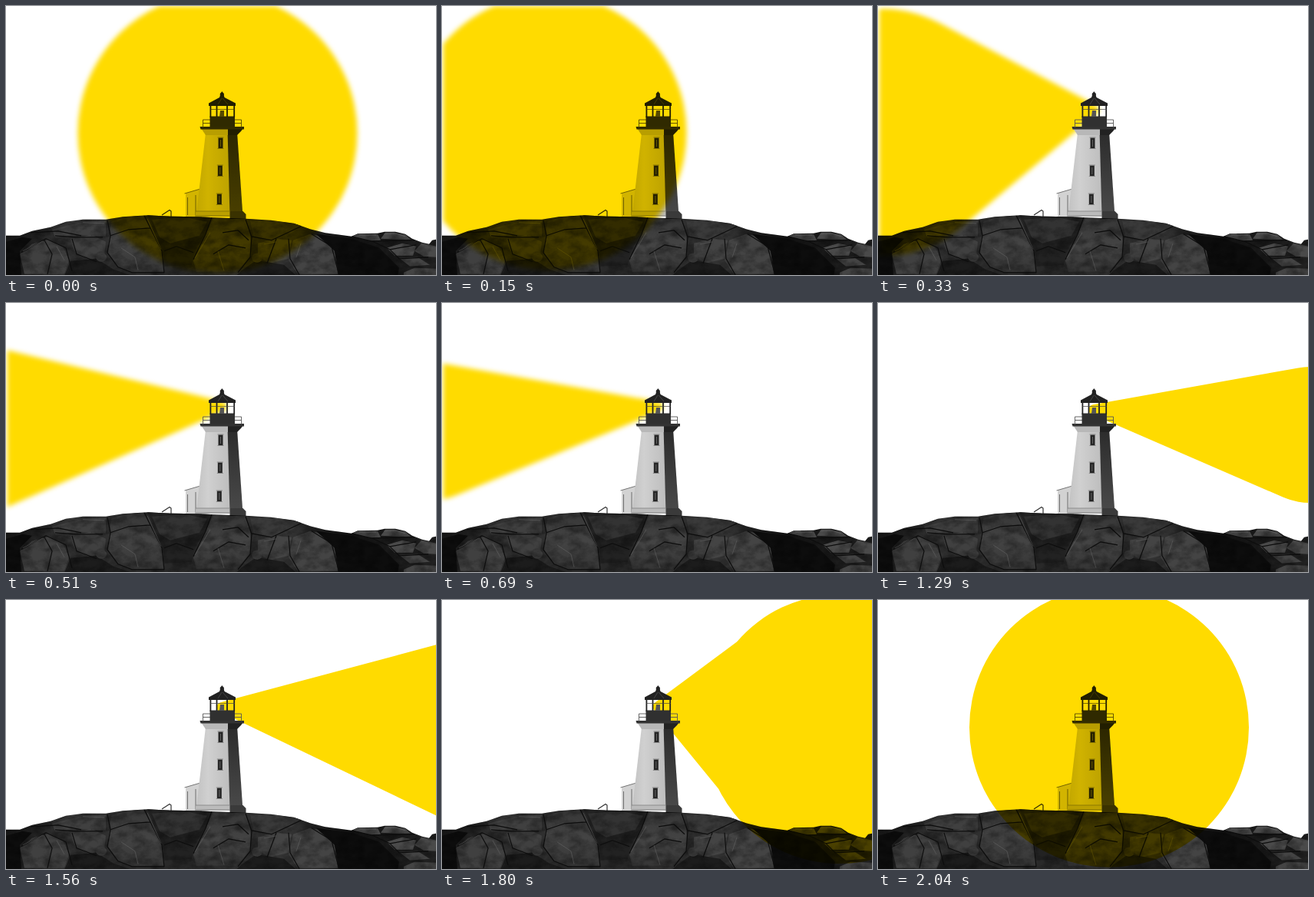
These frames come from a looping animation (560x350 px, 2070 ms). An HTML page:

```html
<!DOCTYPE html>
<html lang="en">
<head>
<meta charset="utf-8">
<title>Lighthouse</title>
<style>
html, body { margin: 0; width: 100%; height: 100%; overflow: hidden; background: #fff; }
#stage { position: relative; width: 560px; height: 350px; overflow: hidden; background: #fff; isolation: isolate; }
svg { position: absolute; left: 0; top: 0; width: 560px; height: 350px; }
#rocks, #tower.tinted { mix-blend-mode: multiply; }
.crack { fill: none; stroke: #0c0c0c; stroke-width: 1.2; stroke-linejoin: round; }
.edge { fill: none; stroke: #777; stroke-width: .8; opacity: .5; }
</style>
</head>
<body>
<div id="stage">
<svg viewBox="0 0 560 350">
  <defs>
    <filter id="soft" filterUnits="userSpaceOnUse" x="-20" y="-20" width="600" height="390" color-interpolation-filters="sRGB">
      <feGaussianBlur id="blur" stdDeviation="3"/>
    </filter>
    <clipPath id="frame"><path d="M1.500 0H580V370H1.500Z"/></clipPath>
  </defs>
  <g filter="url(#soft)"><g clip-path="url(#frame)"><path id="beam" fill="#ffdb00"/></g></g>
</svg>

<svg id="tower" viewBox="0 0 560 350">
  <defs>
    <linearGradient id="lit" x1="0" x2="1" y1="0" y2="0">
      <stop offset="0" stop-color="#c2c2c2"/>
      <stop offset=".35" stop-color="#d0d0d0"/>
      <stop offset="1" stop-color="#bdbdbd"/>
    </linearGradient>
    <linearGradient id="shade" x1="0" x2="0" y1="0" y2="1">
      <stop offset="0" stop-color="#2b2b2b"/>
      <stop offset="1" stop-color="#4a4a4a"/>
    </linearGradient>
  </defs>
  <path fill="#d2d2d2" d="M234 243.500 252 238.500V274H234Z"/>
  <path stroke="#555" fill="none" d="M232.500 244 253 238M236.500 249V272M247 246V272" stroke-width=".8"/>
  <path fill="url(#lit)" d="M260.500 161H289L292 274H247.500Z"/>
  <path fill="url(#shade)" d="M288.500 161H300.800L308.500 274H291.500Z"/>
  <path fill="#bbb" d="M247.500 267H292V274H246.500Z"/>
  <path fill="#3a3a3a" d="M291.500 267H308.500L312.500 271V277H291.500Z"/>
  <path stroke="#777" stroke-width=".7" d="M247 267H292M246 273H292"/>
  <path fill="#b8b8b8" d="M254 159H289V168H260Z"/>
  <path fill="#222" d="M289 159H309L306 163 301 168H289Z"/>
  <path fill="#333" d="M252.500 157H310V160.500H253.500Z"/>
  <path fill="none" stroke="#555" stroke-width=".9" d="M256.500 158V148H266M256.500 152.500H266M298 148H306.500V158M298 152.500H306.500"/>
  <path fill="#303030" d="M265.500 143.500H298V157H265.500Z"/>
  <path fill="none" stroke="#222" stroke-width="1.800" d="M266.400 129V145M297.200 129V145M274.500 130V144M288 130V144"/>
  <path stroke="#444" d="M266 134.500H298" stroke-width=".7"/>
  <path fill="#555" d="M279 136H284V144H278Z"/>
  <path fill="#222" d="M264 126.500 278 119 280 113 281.300 111 282.600 113 284.600 119 299 126.500V130H264Z"/>
  <circle cx="281.300" cy="115" r="2.600" fill="#222"/>
  <path stroke="#555" d="M281 120 276 128M282 120 289 128" stroke-width=".7"/>
  <g id="win">
    <path fill="#252525" d="M276.500 171.500H282.500V185H276.500Z"/>
    <path stroke="#777" stroke-width=".8" d="M275.500 171H283.500M275.500 185.500H283.500M279.500 174V183"/>
  </g>
  <use href="#win" x="-.700" y="36"/>
  <use href="#win" x="-1.700" y="73"/>
</svg>

<svg id="rocks" viewBox="0 0 560 350">
  <defs>
    <linearGradient id="ground" x1="0" x2="1" y1="0" y2="0">
      <stop offset="0" stop-color="#151515"/>
      <stop offset=".14" stop-color="#333"/>
      <stop offset=".4" stop-color="#282828"/>
      <stop offset=".66" stop-color="#333"/>
      <stop offset=".8" stop-color="#121212"/>
      <stop offset="1" stop-color="#222"/>
    </linearGradient>
    <linearGradient id="slab" x1="0" x2="0" y1="0" y2="1">
      <stop offset="0" stop-color="#363636"/>
      <stop offset=".5" stop-color="#444"/>
      <stop offset="1" stop-color="#363636"/>
    </linearGradient>
    <filter id="grain" filterUnits="userSpaceOnUse" x="0" y="265" width="560" height="85" color-interpolation-filters="sRGB">
      <feTurbulence type="fractalNoise" baseFrequency=".06 .09" numOctaves="5" seed="4"/>
      <feColorMatrix values="0 0 0 0 0  0 0 0 0 0  0 0 0 0 0  2 0 0 0 -.7"/>
    </filter>
    <clipPath id="land"><use href="#rock"/></clipPath>
  </defs>
  <path fill="none" stroke="#333" stroke-width="1.200" d="M203 272 213 265.500 215 267V274"/>
  <g transform="translate(0 .8)">
  <path id="rock" fill="url(#ground)" d="M0 298 18 298 34 292 58 287 78 280 100 277 130 277 152 273.500 184 271.500 214 273 250 273.500 312 276 345 278 375 282 396 289.500 416 294.500 450 299 458 295.500 484 295 493 293 507 293 520 296 529 302 542 307 551 309 555 304 560 303V350H0Z"/>
  <g clip-path="url(#land)">
    <path fill="url(#slab)" d="M137 280 154 274 180 272 192 294 204 321 206 345H163L146 339 132 320Z"/>
    <path fill="#222" d="M184 271H268L262 291 246 318 242 336 206 338 204 318Z"/>
    <path fill="#333" d="M190 277 232 274 262 280 252 298 214 308 200 300Z"/>
    <path fill="url(#slab)" d="M270 275 312 277 318 296 319 324 300 345H248L244 331 252 312Z"/>
    <path fill="#3a3a3a" d="M318 278 352 279 385 284 366 299 340 304 322 299Z"/>
    <path fill="#444" d="M328 308 352 302 372 304 368 328 344 334 328 326ZM374 304 396 296 416 300 428 318 432 348H380L368 330Z"/>
    <path fill="#404040" d="M18 322 34 309 56 303 74 312 82 330 76 348H24ZM84 302 112 297 130 306 128 324 108 330 90 320ZM60 290 104 279 130 279 130 299 98 297 64 300Z"/>
    <path fill="#0d0d0d" d="M0 306 22 300 34 302 18 318 20 350H0ZM404 296 450 302 486 314 512 340 510 350H434L428 318Z"/>
    <path fill="#4a4a4a" d="M452 299 458 296 484 296 488 304 474 305ZM488 302 494 294 507 294 520 297 527 303 508 303ZM532 318 541 308 552 310 560 312V326L544 325ZM496 314 516 308 534 312 530 324 506 324Z"/>
    <path fill="#444" d="M518 346 532 340 560 341V350H518ZM512 327 536 326 552 336 526 338Z"/>
    <path fill="#1c1c1c" d="M84 331 118 328 140 342 164 350H76ZM306 344 326 330 362 336 378 350H300Z"/>
    <ellipse cx="124" cy="326" rx="7" ry="6" fill="#484848"/>
    <ellipse cx="327" cy="327" rx="7" ry="6" fill="#454545"/>
    <rect y="265" width="560" height="85" filter="url(#grain)" opacity=".4"/>
    <path class="crack" d="M132 278 136 298 132 320 146 339 164 346H206L203 318 180 272M136 298 160 290 188 288M268 274 260 296 244 329M312 277 320 300 318 326 302 346M244 320 222 312 206 318M320 299 346 304 384 286M368 302 370 328 382 349M352 302 340 334M398 296 424 312 434 350"/>
    <path class="crack" d="M20 320 52 302 78 314 86 344M50 304 60 322 54 348M64 298 90 300 126 300M86 302 92 322 118 332M32 294 68 292 98 298M450 299 476 305 532 304M476 305 500 316 534 310M500 316 512 328 550 326M282 294 302 291 316 304M270 322 290 310 312 314"/>
    <path class="edge" d="M184 276 202 316M246 327 266 294M22 318 48 305M150 314 168 326 172 343M276 318 284 344M66 312 76 330M384 308 378 326M460 297 482 297M492 296 506 295 520 299M336 309 352 306M100 281 128 282"/>
  </g>
  </g>
</svg>
</div>
<script>
const LOOP = 2070, STEP = 30;
const LAMP = { x: 281, y: 137, r: 6.5 };
// time, centre x and radius of the far disc, angle by which the cone is narrower than its tangents
const KEYS = [
  [0, 275.5, 182, 0], [330, 5, 161, 0], [540, -55, 108, 0], [690, -16, 90, 0], [1020, 289.5, 71, 0],
  [1080, 353, 73, 0], [1290, 563, 88.5, 0], [1620, 600, 133, 0], [1800, 517, 175, .2], [2040, 301, 182, 0]
];
const tower = document.getElementById('tower');
const beam = document.getElementById('beam');
const blur = document.getElementById('blur');

function key(i) {
  const n = KEYS.length, lap = Math.floor(i / n), k = KEYS[i - lap * n];
  return [k[0] + lap * LOOP, ...k.slice(1)];
}

function slope(i, c) {
  const a = key(i - 1), b = key(i), d = key(i + 1);
  const h0 = b[0] - a[0], h1 = d[0] - b[0];
  return ((b[c] - a[c]) / h0 * h1 + (d[c] - b[c]) / h1 * h0) / (h0 + h1);
}

// smooth periodic curve through the keys
function sample(t, c) {
  let i = KEYS.length - 1;
  while (KEYS[i][0] > t) i--;
  const a = key(i), b = key(i + 1), h = b[0] - a[0], u = (t - a[0]) / h, v = 1 - u;
  return v * v * ((1 + 2 * u) * a[c] + u * h * slope(i, c))
       + u * u * ((1 + 2 * v) * b[c] - v * h * slope(i + 1, c));
}

function rim(disc, angle) {
  return (disc.x + disc.r * Math.cos(angle)).toFixed(2) + ' ' + (disc.y + disc.r * Math.sin(angle)).toFixed(2);
}

// outline around the lamp and the far disc
function outline(lamp, far, pinch) {
  const dx = far.x - lamp.x, dy = far.y - lamp.y, d = Math.hypot(dx, dy), r = far.r;
  if (d <= r - lamp.r) {
    return `M${far.x - r} ${far.y}a${r} ${r} 0 1 1 ${2 * r} 0a${r} ${r} 0 1 1 ${-2 * r} 0Z`;
  }
  const axis = Math.atan2(dy, dx), turn = Math.PI / 2 + Math.asin((r - lamp.r) / d);
  const wide = Math.min(turn + pinch, Math.PI - .01);
  return `M${rim(lamp, axis - turn)}L${rim(far, axis - wide)}`
    + `A${r} ${r} 0 1 1 ${rim(far, axis + wide)}L${rim(lamp, axis + turn)}`
    + `A${lamp.r} ${lamp.r} 0 0 1 ${rim(lamp, axis - turn)}Z`;
}

function draw(now) {
  const t = Math.floor(now % LOOP / STEP) * STEP, phase = 2 * Math.PI * t / LOOP;
  const tilt = 2.5 * Math.sin(phase);
  const lamp = { ...LAMP, y: LAMP.y - tilt };
  const far = { x: sample(t, 1), y: 168 - 2.5 * Math.cos(phase) - tilt, r: sample(t, 2) };
  beam.setAttribute('d', outline(lamp, far, sample(t, 3)));
  const fade = Math.min(1, Math.max(0, (t - 690) / 330));
  blur.setAttribute('stdDeviation', 3 - 2.5 * fade);
  // the disc tints the tower only while it faces the viewer
  const facing = Math.cos(phase) > 0 && Math.hypot(far.x - lamp.x, far.y - lamp.y) < far.r;
  tower.classList.toggle('tinted', facing);
}

let start;
function tick(now) {
  if (start === undefined) start = now;
  draw(now - start);
  requestAnimationFrame(tick);
}
draw(0);
requestAnimationFrame(tick);
</script>
</body>
</html>
```
